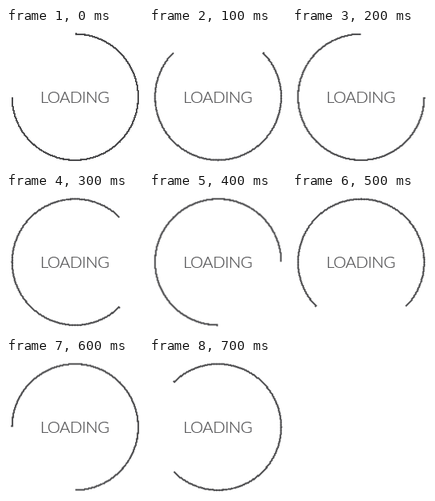
These frames come from a looping animation (172x172 px, 0.8 s). An HTML page:

```html
<!DOCTYPE html>
<html lang="en">
<head>
<meta charset="utf-8">
<title>Loading</title>
<style>
  html, body { margin: 0; width: 100%; height: 100%; overflow: hidden; background: #fff; }
  svg { display: block; width: 172px; height: 172px; }
  .ring {
    fill: none;
    stroke: #4d4d4f;
    stroke-width: 2.2;
    shape-rendering: crispEdges;
    transform-origin: 86.8px 86.7px;
    animation: turn 800ms steps(8) infinite;
  }
  text { font: 300 20.3px Lato, "Open Sans", sans-serif; letter-spacing: -.4px; fill: #4d4d4f; stroke: #4d4d4f; stroke-width: .2px; }
  @keyframes turn { to { transform: rotate(360deg); } }
</style>
</head>
<body>
<svg viewBox="0 0 172 172">
  <path class="ring" d="M86.8 7.5A79.2 79.2 0 1 1 7.6 86.7"/>
  <text x="43" y="94">LOADING</text>
</svg>
</body>
</html>
```
